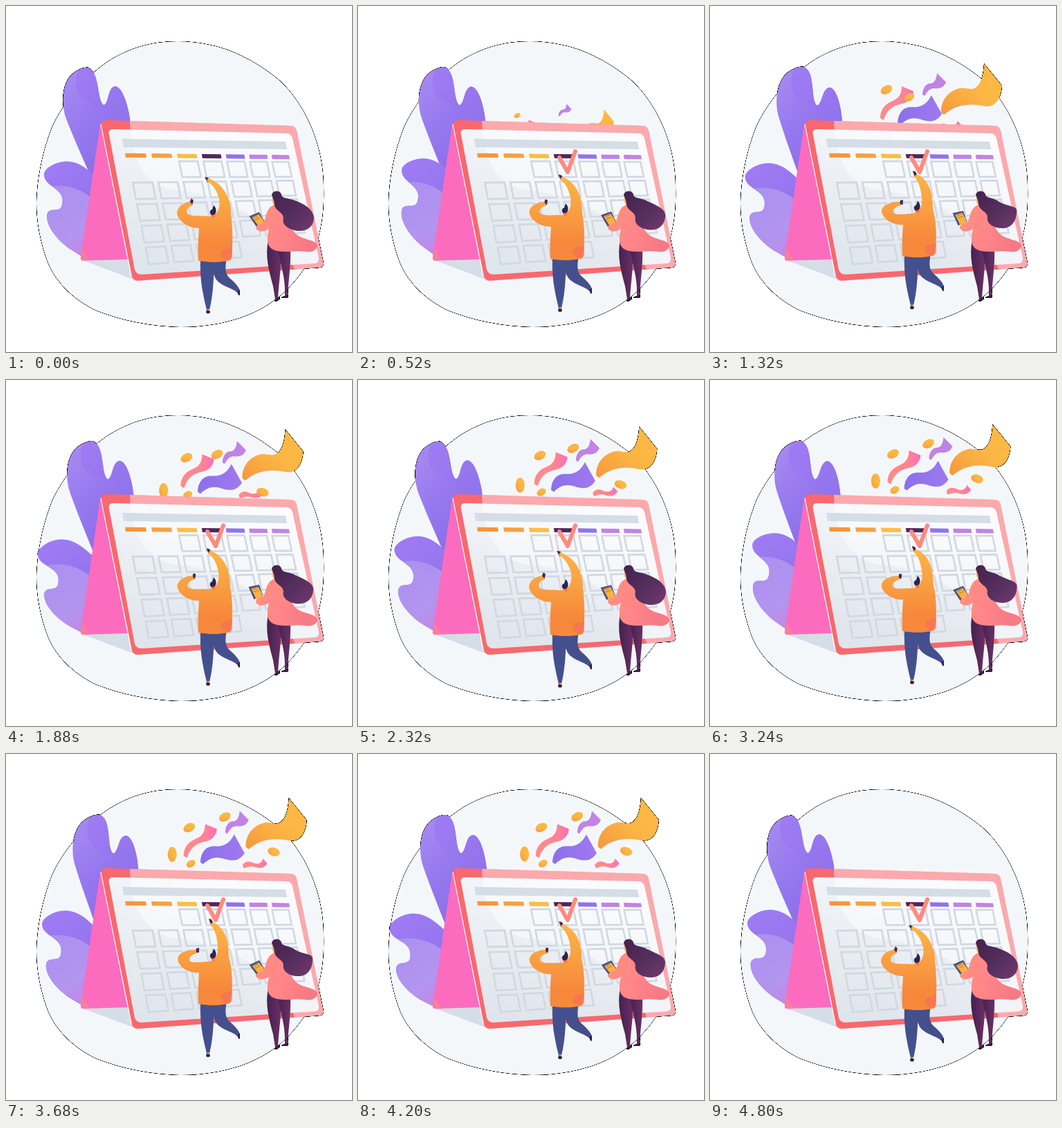
An HTML page that plays this animation: 500 by 500 pixels, repeating every 4.84 s.

```html
<!DOCTYPE html>
<html lang="en">
<head>
<meta charset="utf-8">
<title>Calendar planning</title>
<style>
html, body { margin: 0; width: 100%; height: 100%; overflow: hidden; background: #fff; }
svg { display: block; width: 100vw; height: 100vh; }
</style>
</head>
<body>
<svg viewBox="0 0 500 500">
  <defs>
    <!-- Turns the half-covered pixels of the silhouette dark. -->
    <filter id="edge" x="0" y="0" width="500" height="500" filterUnits="userSpaceOnUse" color-interpolation-filters="sRGB">
      <feComponentTransfer in="SourceAlpha" result="rim"><feFuncA type="linear" slope="3"/></feComponentTransfer>
      <feComponentTransfer in="SourceGraphic" result="scene"><feFuncA type="linear" slope="2" intercept="-1"/></feComponentTransfer>
      <feMerge><feMergeNode in="rim"/><feMergeNode in="scene"/></feMerge>
    </filter>
    <linearGradient id="leaf" x1="0" y1="0" x2=".5" y2="1"><stop stop-color="#a07cf4"/><stop offset="1" stop-color="#8c70ea"/></linearGradient>
    <linearGradient id="pale" x1="0" y1="0" x2=".6" y2="1"><stop stop-color="#a98df2"/><stop offset=".5" stop-color="#9577ee"/><stop offset="1" stop-color="#866be6"/></linearGradient>
    <linearGradient id="mist" x1="0" y1="0" x2=".6" y2="1"><stop stop-color="#ab8ff1"/><stop offset=".7" stop-color="#b295ee"/><stop offset="1" stop-color="#c586e6"/></linearGradient>
    <linearGradient id="page" x1=".7" y1="0" x2=".3" y2="1"><stop stop-color="#f8f9fb"/><stop offset="1" stop-color="#dfe5ec"/></linearGradient>
    <linearGradient id="gold" x1="1" y1="0" x2="0" y2="1"><stop stop-color="#fdbb43"/><stop offset=".5" stop-color="#fbb544"/><stop offset="1" stop-color="#f6973f"/></linearGradient>
    <linearGradient id="violet" x1="0" y1="0" x2="1" y2="0"><stop stop-color="#8a70ea"/><stop offset="1" stop-color="#9f79f0"/></linearGradient>
    <linearGradient id="rose" x1="0" y1="0" x2="1" y2="0"><stop stop-color="#ff8c88"/><stop offset=".7" stop-color="#ff8295"/><stop offset="1" stop-color="#fb6cbe"/></linearGradient>
    <linearGradient id="sweater" x1="0" y1="0" x2="0" y2="1"><stop stop-color="#fcb545"/><stop offset=".45" stop-color="#f99d41"/><stop offset=".8" stop-color="#f7873b"/><stop offset="1" stop-color="#f68a3c"/></linearGradient>
    <linearGradient id="coat" x1="0" y1="0" x2="1" y2=".3"><stop stop-color="#ff917c"/><stop offset=".55" stop-color="#ff8689"/><stop offset="1" stop-color="#f57a86"/></linearGradient>
    <linearGradient id="hair" x1="0" y1="0" x2="1" y2="1"><stop stop-color="#43214f"/><stop offset=".6" stop-color="#57305f"/><stop offset="1" stop-color="#74396f"/></linearGradient>
    <linearGradient id="tights" x1="0" y1="0" x2="1" y2="0"><stop stop-color="#43214d"/><stop offset="1" stop-color="#6d2f68"/></linearGradient>
    <clipPath id="frame"><path d="M145 165L412 173Q419 174 420 180L459 372Q459 377 454 378L191 397Q184 397 182 391L138 173Q137 165 145 165Z"/></clipPath>
  </defs>

  <g filter="url(#edge)">
    <path fill="#f4f7fa" d="M248 51C310 51 357 76 396 108C437 147 459 207 459 260C460 292 457 317 449 343C441 367 427 388 407 409C370 446 315 464 252 464C210 463 168 455 130 440C95 423 72 398 61 372C49 341 44 311 44 284C45 252 51 215 66 176C82 141 108 110 139 86C172 62 208 51 248 51Z"/>

    <g id="tallLeaf">
      <path fill="url(#pale)" d="M135 275C120 240 98 192 87 163C79 140 81 111 96 98C105 91 113 88 119 89C129 94 131 106 134 124C136 138 140 144 142 143C149 139 147 117 158 116C168 117 176 142 179 162L184 275Z"/>
      <path fill="url(#leaf)" d="M104 94C110 90 115 88 119 89C129 94 131 106 134 124C136 138 140 144 142 143C149 139 147 117 158 116C168 117 176 142 179 162L183 240C165 220 162 170 143 153C131 142 114 140 106 127C100 118 100 104 104 94Z"/>
    </g>
    <g id="lowLeaf">
      <path fill="url(#leaf)" d="M140 260C125 244 111 226 88 225C70 225 54 236 54 244C54 261 79 263 81 280C82 305 64 288 59 301C56 318 75 340 93 352L116 366L150 360Z"/>
      <path fill="url(#mist)" d="M66 261C74 266 80 271 81 280C82 305 64 288 59 301C56 318 75 340 93 352L116 366L140 350L132 285C116 270 95 257 66 261Z"/>
    </g>

    <g id="confetti"></g>

    <path fill="#d5dde6" d="M112 368L176 365L184 395Z"/>
    <path fill="#fb6cbe" d="M136 171Q137 167 140 174L179 366L112 368Q107 368 108 363Z"/>
    <path fill="#fb7d9c" d="M110 350L121 367L112 368Q107 368 108 363Z"/>
    <path fill="none" stroke="#fff" stroke-width="3" d="M138 171L182 390"/>
    <g clip-path="url(#frame)">
      <path fill="#f8686e" d="M130 160H465V400H130Z"/>
      <path fill="url(#page)" d="M155 178L405 184Q412 184 414 191L452 364Q453 371 446 372L196 388Q188 388 186 381L149 186Q147 178 155 178Z"/>
      <path fill="#fff" opacity=".43" d="M179 160C179 215 196 262 250 267C330 275 405 325 420 390H480V160Z"/>
    </g>
    <path fill="#d5dde7" d="M168 192L404 196L406 207L170 204Z"/>
    <g id="days"></g>
    <path id="cells" fill="none" stroke="#d0d8e2" stroke-width="2.6"/>
    <path id="check" fill="none" stroke="#ff8a80" stroke-width="6" stroke-linejoin="round" stroke-linecap="round" pathLength="1" stroke-dasharray="1 2" d="M291 219L303 240L314 210"/>

    <g id="legs">
      <path fill="#444f8d" d="M281 364L301 366C300 400 299 418 294 439H290C283 411 280 393 281 364Z"/>
      <path fill="#444f8d" d="M298 366L319 364C316 380 317 387 323 393C331 400 337 406 338 412L334 414C327 407 307 404 302 392C299 384 298 378 298 366Z"/>
      <path fill="#3a1d38" d="M290 439H294L295 443Q292 446 289 443ZM334 413L338 410L338 418H336Z"/>
      <path fill="#f9a84d" d="M290.500 438H294V440H291Z"/>
    </g>
    <path id="hands" fill="#4c2848"/>
    <path id="torso" fill="url(#sweater)"/>
    <g id="head">
      <path fill="#f4705f" d="M296 295L303 299L301 306Q295 304 295 299Z"/>
      <path fill="#2c2350" d="M300 288C305 292 305 301 299 302C293 301 294 295 298 294Z"/>
    </g>
    <path id="pocket" fill="#f76b5e" opacity=".6" d="M327 347V364L318 367C310 363 309 357 313 353C318 350 323 352 327 347Z"/>

    <path fill="url(#tights)" d="M379 338C374 362 380 382 386 405L389 424H393C394 400 398 380 398 350Z"/>
    <path fill="url(#tights)" d="M393 350C397 378 404 390 403 419H407C408 396 412 375 411 350Z"/>
    <path fill="#3a1d44" d="M388 426L395 420L396 423L391 427ZM398 421L408 417L407 422H398Z"/>
    <g id="phone">
      <path fill="#4a5182" d="M351 302L366 297L373 312L361 319Z"/>
      <path fill="#fbb040" d="M355 304L365 300L371 309L374 318L364 318Z"/>
      <path stroke="#b77a45" d="M357 305L364 302M359 308L366 305"/>
    </g>
    <path fill="url(#coat)" d="M388 287C378 291 376 300 374 309C371 317 361 314 361 321C365 328 374 326 380 322C377 334 376 345 384 351C399 359 414 352 433 355C442 357 450 352 450 346C448 338 431 338 421 331C409 322 411 306 402 295Z"/>
    <path fill="none" stroke="#ef717f" opacity=".35" d="M380 322C388 316 389 308 386 301M386 321C397 329 411 333 424 334"/>
    <path fill="#fbb040" d="M385 276L391 277L392 288L387 287Q384 283 385 276Z"/>
    <path id="mane" fill="url(#hair)"/>
  </g>
</svg>
<script>
const LOOP = 4840, SWAY = LOOP / 2, DRIFT = 640;
const $ = id => document.getElementById(id);
const set = (el, attrs) => { for (const k in attrs) el.setAttribute(k, attrs[k]); return el; };
const add = (parent, tag, attrs) =>
  parent.appendChild(set(document.createElementNS('http://www.w3.org/2000/svg', tag), attrs));
const clamp = x => Math.max(0, Math.min(1, x));

// Blends two paths that share the same commands.
const blend = (a, b, k) => {
  const to = b.match(/[\d.]+/g);
  let i = 0;
  return a.replace(/[\d.]+/g, n => (+n + (to[i++] - n) * k).toFixed(2));
};

const poses = {
  torso: [
    'M292 249C312 255 326 277 325 300C328 325 328 350 325 367C310 371 294 371 278 368C277 350 278 335 279 321C262 321 247 309 247 298C249 288 258 284 266 283L270 288C262 290 259 296 263 301C273 305 283 302 294 304C306 303 310 292 308 279C305 267 299 258 290 253Z',
    'M299 243C314 250 322 264 322 293C328 315 328 340 324 360C310 364 294 364 278 361C277 345 278 330 279 316C262 317 248 306 248 295C251 286 262 283 274 283L276 288C268 290 263 294 265 299C273 303 283 300 292 300C303 298 307 290 306 278C305 264 302 254 295 246Z'],
  hands: [
    'M287 247L292 248L296 253L291 255ZM265 284L268 278L271 281L269 288Z',
    'M293 238L297 239L300 245L296 247ZM274 287L275 281L279 280L279 287Z'],
  mane: [
    'M384 273C385 267 395 265 398 272C398 279 409 277 420 282C436 288 445 297 445 307C444 320 434 326 421 325C408 323 398 316 401 306C400 297 390 297 388 288C388 282 386 279 384 273Z',
    'M384 273C385 267 395 265 398 272C398 278 409 276 418 283C430 290 441 288 443 294C444 312 434 322 422 321C409 321 399 314 401 304C399 296 390 296 388 287C388 281 386 278 384 273Z']
};

const weekdays = ['#f8953f', '#f8a043', '#fbbd45', '#52265a', '#8f74ea', '#c183e6', '#c183e6'];
weekdays.forEach((fill, i) => {
  const x = 172 + 38.6 * i - .55 * i * i, y = 212.7 + .4 * i, w = 30 - .8 * i;
  add($('days'), 'path', { fill, d: `M${x} ${y}l${w} .4l1 6l${-w} -.2z` });
});

let grid = '';
for (let r = 0; r < 5; r++)
  for (let c = r ? 0 : 2; c < (r < 4 ? 7 : 4); c++) {
    const x = 177 + 37.6 * c - .5 * c * c + 6.2 * r, y = 224 + .2 * c + r * (31.2 - .65 * c);
    const w = 28.5 - .8 * c, h = 23.5 - .3 * c;
    grid += `M${x} ${y}l${w} ${-.3 * r}l4.500 ${h}l${-w} ${.5 * r}z`;
  }
set($('cells'), { d: grid });

// Each piece: resting centre, distance left to travel at 1320 ms, start of growth.
const pieces = [];
const piece = (x, y, dx, dy, delay, turn, tag, attrs) =>
  pieces.push({ x, y, dx, dy, delay, turn, el: add($('confetti'), tag, attrs) });
const ribbon = (x, y, dx, dy, fill, d) => piece(x, y, dx, dy, 0, 0, 'path', { fill, d });
const dot = (x, y, dx, dy, delay, rx, ry, turn) =>
  piece(x, y, dx, dy, delay, turn, 'ellipse', { cx: x, cy: y, rx, ry, fill: 'url(#gold)' });

ribbon(391, 100, -13, 20, 'url(#gold)', 'M409 63L435 95C434 112 427 126 411 125C390 120 369 122 351 137L347 134C346 119 355 105 370 100C381 96 387 102 395 99C405 94 408 79 409 63Z');
ribbon(281, 126, -11, 15, 'url(#rose)', 'M288 101L305 108C304 119 297 125 285 127C272 130 265 139 262 150L257 147C257 136 262 128 273 123C284 119 288 112 288 101Z');
ribbon(313, 137, -10, 13, 'url(#violet)', 'M330 116L345 143C338 154 329 155 318 152C305 147 295 149 285 159L281 156C282 141 289 133 301 133C314 134 323 130 330 116Z');
ribbon(360, 158, -14, 15, 'url(#rose)', 'M372 151L378 158C374 164 367 166 360 163C354 161 349 163 344 165L342 160C346 154 352 154 358 157C365 160 370 157 372 151Z');
ribbon(334, 98, -10, 15, '#c183e6', 'M338 82L351 95C348 103 341 105 334 104C326 104 324 109 320 115L317 113C317 104 322 97 328 97C335 97 337 90 338 82Z');
dot(265, 106, -10, 15, 0, 9, 6, -28);
dot(317, 90, -29, 42, 500, 9, 6, -28);
dot(241, 144, -32, 38, 500, 6.5, 11, 0);
dot(267.5, 158, -12, 19, 400, 7, 5, -30);
dot(388, 140, -41, 53, 500, 9, 6, 18);

function draw(t) {
  const angle = 2 * Math.PI * t / SWAY;
  const lift = (1 - Math.cos(angle)) / 2;
  set($('tallLeaf'), { transform: `rotate(${4.2 * lift} 140 330)` });
  set($('lowLeaf'), { transform: `rotate(${4.7 * Math.sin(angle + .1)} 150 352)` });

  for (const id in poses) set($(id), { d: blend(...poses[id], lift) });
  for (const id of ['legs', 'head', 'pocket']) set($(id), { transform: `translate(0 ${-6.5 * lift})` });
  const tilt = Math.cos(2 * Math.PI * (t + 720) / LOOP);
  set($('phone'), { transform: `translate(${1.5 * tilt} ${1.5 * tilt}) rotate(${-7 * tilt} 364 309)` });

  const drawn = clamp((t - 80) / 360);
  set($('check'), { 'stroke-dashoffset': 1 - drawn, visibility: drawn ? 'visible' : 'hidden' });

  const left = Math.exp((1320 - t) / DRIFT);
  for (const { x, y, dx, dy, delay, turn, el } of pieces) {
    const size = clamp((t - delay) / 950);
    set(el, { transform: `translate(${x + dx * left} ${y + dy * left}) scale(${size}) rotate(${turn}) translate(${-x} ${-y})` });
  }
  set($('confetti'), { opacity: clamp((4700 - t) / 400) });
}

const start = performance.now();
(function tick() {
  draw((performance.now() - start) % LOOP);
  requestAnimationFrame(tick);
})();
</script>
</body>
</html>
```
